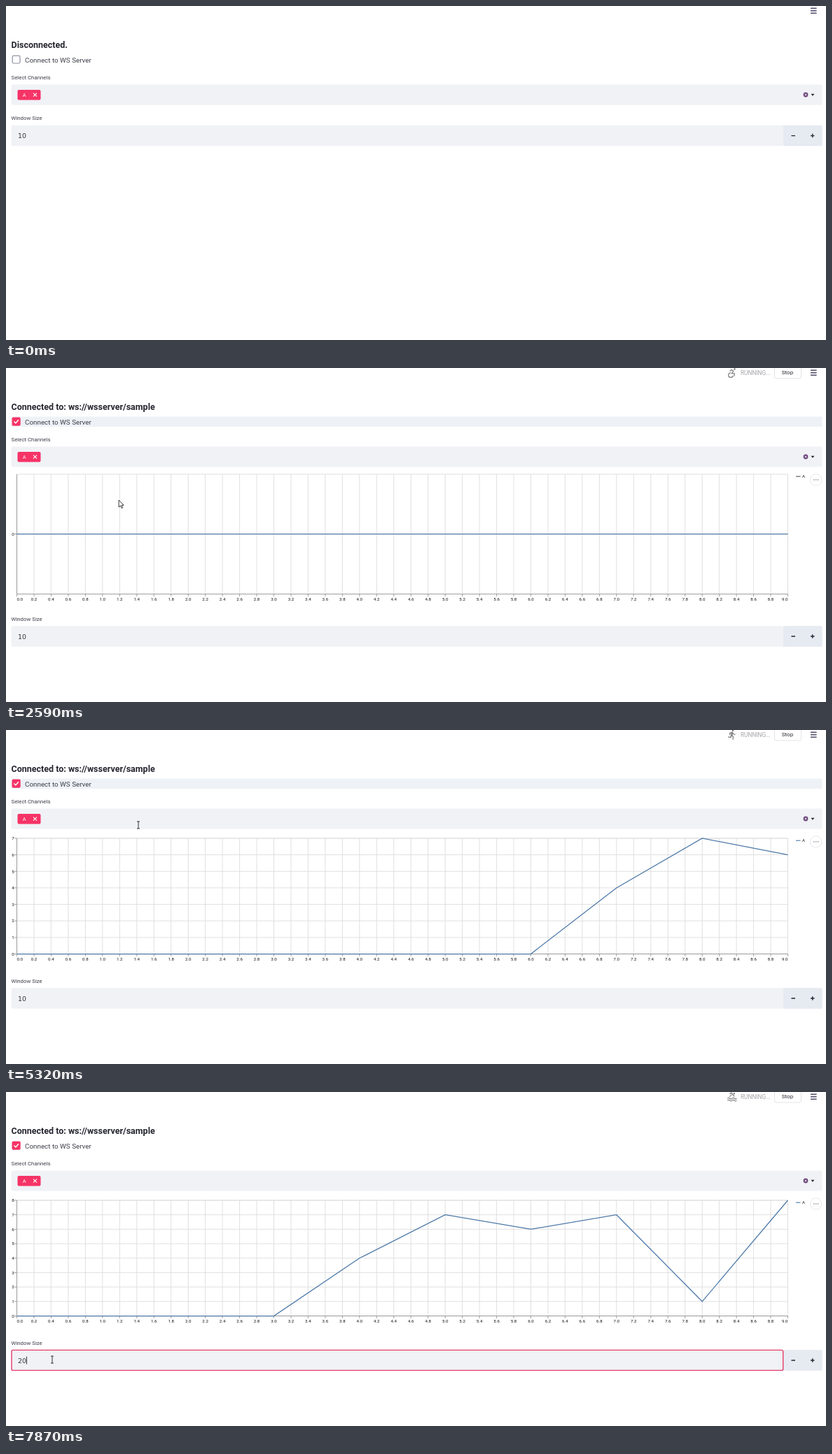
These frames come from a looping animation (1171 px wide and 478 px high, 8000 ms). An HTML page:

```html
<!DOCTYPE html>
<html lang="en">
<head>
<meta charset="utf-8">
<style>
html, body { margin: 0; height: 100%; overflow: hidden; background: #fff; }
svg { display: block; width: 1171px; height: 478px; font-family: Roboto, "Noto Sans", sans-serif; }
</style>
</head>
<body>
<svg id="stage" viewBox="0 0 1171 478"></svg>
<script>
const LOOP = 8000;
const CONNECT = 2200, CHART = 2430, FOCUS = 6800;
const INK = '#262730', PINK = '#f63366', PANEL = '#f0f2f6';
const stage = document.getElementById('stage');

const clamp = v => Math.max(0, Math.min(1, v));
const rect = (x, y, w, h, fill, extra = '') =>
  `<rect x="${x}" y="${y}" width="${w}" height="${h}" fill="${fill}" ${extra}/>`;
const text = (x, y, size, str, fill = INK, extra = '') =>
  `<text x="${x}" y="${y}" font-size="${size}" fill="${fill}" ${extra}>${str}</text>`;
const line = (d, color, width = 1, extra = '') =>
  `<path d="${d}" fill="none" stroke="${color}" stroke-width="${width}" ${extra}/>`;
const dot = (x, y, r, fill, extra = '') =>
  `<circle cx="${x}" cy="${y}" r="${r}" fill="${fill}" ${extra}/>`;

// Values reach the sliding window of ten at these moments.
const series = [...Array(10).fill(0), 4, 7, 6, 7, 1, 8];
const arrivals = [3290, 4290, 5320, 5750, 6330, 6870];

// [time, input text]
const typed = [[0, '10'], [7170, '1'], [7250, ''], [7400, '2'], [7550, '20']];

// Pointer moves: start, end, steps, then waypoints [part, x, y].
const moves = [
  [980, 1140, 3, [[0, 300, 288], [1, 264, 205]]],
  [1370, 2130, 11, [[0, 264, 205], [.75, 28, 86], [.9, 4, 65], [1, 13, 72]]],
  [2200, 2740, 8, [[0, 13, 72], [.143, 13, 72], [.714, 161, 189], [1, 303, 272]]],
  [3610, 4370, 11, [[0, 303, 272], [.4, 262, 222], [1, 189, 136]]],
  [6250, 6710, 7, [[0, 189, 136], [.5, 120, 270], [1, 66, 383]]]
];

function pointer(t) {
  const move = moves.filter(m => t >= m[0]).pop();
  if (!move) return null;
  const [from, to, steps, way] = move;
  const part = Math.floor(clamp((t - from) / (to - from)) * (steps - 1) + .01) / (steps - 1);
  const i = Math.max(1, way.findIndex(w => w[0] >= part - 1e-6));
  const [a, ax, ay] = way[i - 1], [b, bx, by] = way[i];
  const k = clamp((part - a) / (b - a));
  return { x: ax + (bx - ax) * k, y: ay + (by - ay) * k };
}

function drawPointer({ x, y }, inputTop) {
  const inside = (top, bottom) => y >= top && y <= bottom;
  let shape;
  if (inside(112, 141) || inside(inputTop, inputTop + 30))
    shape = line('M-2-5H2M0-5V5M-2 5H2', '#333', 1);
  else if (inside(70, 84) && x < 123)
    shape = '<path d="M-1 8V.5Q0-1 1 .5V5L5 5.5Q7 6 6.5 8L5.5 13H-.5L-4 8Q-4 6.3-2.6 6.9L-1 8.5zM3 5V8M5 5.5V8" fill="#fff" stroke="#222" stroke-width=".9"/>';
  else
    shape = '<path d="M0 0V10L2.4 7.8 4 11.5 5.6 10.8 4 7.2H7z" fill="#fff" stroke="#222" stroke-width=".9"/>';
  return `<g transform="translate(${x.toFixed(1)} ${y.toFixed(1)})">${shape}</g>`;
}

// Activity pictograms on a 24 unit grid: filled, or stroked when the flag is set.
const head = (x, y) => `M${x - 1} ${y}a1 1 0 1 0 2 0a1 1 0 1 0-2 0`;
const wave = y => `M2 ${y}q2.5-2.4 5 0t5 0 5 0 5 0`;
const icons = [
  ['M13.5 5.5a2 2 0 1 0 0-4 2 2 0 0 0 0 4zm-3.6 13.9l1-4.4 2.1 2v6h2v-7.5l-2.1-2 .6-3c1.3 1.5 3.3 2.5 5.5 2.5v-2c-1.9 0-3.5-1-4.3-2.4l-1-1.6c-.4-.6-1-1-1.7-1-.3 0-.5.1-.8.1l-5.2 2.2v4.7h2v-3.4l1.8-.7-1.6 8.1-4.9-1-.4 2 7 1.4z'],
  [head(16.5, 5.5) + 'M6.5 6.5L10.5 4 17 12M11 8L6.5 12.5' + wave(16) + wave(20.5), true],
  ['M8.5 14.5L4 19l1.5 1.5L9 17h2zM15 1a2 2 0 1 0 0 4 2 2 0 0 0 0-4zm6 20l-3 3-3-3v-1.5l-7.1-7.1-.9.1v-2.2c1.7 0 3.6-.9 4.7-2l1.4-1.6c.5-.5 1-.7 1.7-.7 1.2 0 2.2 1 2.2 2.3V14c0 .8-.4 1.6-.9 2.2l-3.6-3.6v-2.3c-.6.5-1.4 1-2.3 1.4l6.3 6.3H18z'],
  ['M12 2a2 2 0 1 1 0 4 2 2 0 0 1 0-4zm9 7h-6v13h-2v-6h-2v6H9V9H3V7h18z'],
  [head(17.5, 4.5) + 'M9.5 12.5A5 5 0 1 0 14 18.5M7 9L10.5 6 15 8.5 11.5 14H17V20', true],
  [head(15.5, 3.5) + 'M1 17a4 4 0 1 0 8 0a4 4 0 1 0-8 0M15 17a4 4 0 1 0 8 0a4 4 0 1 0-8 0M12 20V15L9 12 12.5 8.5 14.5 11H19', true]
];

function drawStatus(t) {
  const n = Math.floor((t - 2850) / 200);
  const [d, stroked] = icons[(n + 12) % 6];
  const color = '#858585';
  const icon = stroked ? line(d, color, 2) : `<path d="${d}" fill="${color}"/>`;
  return `<g opacity="${clamp((t - 2250) / 250).toFixed(2)}">
    <g transform="translate(1029 -1.4) scale(.66)">${icon}</g>
    ${text(1049, 10, 8.3, 'RUNNING...', '#a3a4aa')}
    ${rect(1097.5, -5, 38, 20, '#fff', 'rx="2.5" stroke="#e2e3e8"')}
    ${text(1116, 9, 8, 'Stop', INK, 'text-anchor="middle"')}</g>`;
}

function drawChart(t, hover) {
  const n = arrivals.filter(a => t >= a).length;
  const data = series.slice(n, n + 10);
  const max = Math.max(...data), flat = max === 0;
  const step = max < 5 ? .5 : 1, digits = max && max < 5 ? 1 : 0;
  const left = digits ? 20.5 : 15.5, right = 1116.5;
  const top = flat ? 152 : 155, bottom = flat ? 323.5 : 320.5;
  const px = v => left + v / 9 * (right - left);
  const py = v => flat ? 237.5 : bottom - v / max * (bottom - top);
  let grid = '', ticks = '', labels = '';
  for (let i = 0; i <= 45; i++) {
    const x = px(i / 5).toFixed(1);
    grid += `M${x} ${top}V${bottom}`;
    ticks += `M${x} ${bottom}v3.5`;
    const anchor = i === 0 ? 'start' : i === 45 ? 'end' : 'middle';
    labels += text(x, bottom + 9.8, 6.2, (i / 5).toFixed(1), '#111', `text-anchor="${anchor}"`);
  }
  for (let v = 0; v <= max; v += step) {
    const y = py(v).toFixed(1);
    if (!flat) grid += `M${left} ${y}H${right}`;
    ticks += `M${left} ${y}h-3.5`;
    labels += text(left - 3.8, +y + 2.2, 6.2, v.toFixed(digits), '#111', 'text-anchor="end"');
  }
  const points = data.map((v, i) => `${px(i).toFixed(1)} ${py(v).toFixed(1)}`).join('L');
  const key = top + 3.2;
  const ink = hover ? INK : '#b5b6bb';
  return line(grid, '#ddd', .9) +
    line(`M${left} ${top}H${right}V${bottom}`, '#ddd', .9) +
    line(ticks + `M${left} ${top}V${bottom}H${right}`, '#888', .8) + labels +
    (flat ? line(`M${left} 237.5H${right}`, '#777', 1) : '') +
    line('M' + points, '#4c78a8', 1.25) +
    line(`M1128 ${key}h6.5`, flat ? '#555' : '#4c78a8', 1.1) +
    text(1137, key + 2, 6.2, 'A', '#111') +
    dot(1156.7, 160, 8.2, '#fff', `stroke="${hover ? '#666873' : '#e4e5ea'}" stroke-width=".9"`) +
    [-3, 0, 3].map(dx => dot(1156.7 + dx, 160, 1.1, ink)).join('');
}

function drawForm(t) {
  const on = t >= CONNECT;
  const check = on
    ? `<g opacity="${clamp((t - CONNECT) / 150).toFixed(2)}">` + rect(8.5, 70.5, 12.2, 12.2, PINK, 'rx="2"') +
      line('M11.5 76.6L13.8 79 17.9 74.2', '#fff', 1.5) + '</g>'
    : rect(9.2, 71.2, 10.8, 10.8, '#fff', 'rx="1.8" stroke="#8d90a0" stroke-width="1.2"');
  return line('M1149 3.3h8.6M1149 6.8h8.6M1149 10.3h8.6', '#514c68', 1.6) +
    text(7.5, 59.7, 12.5, on ? 'Connected to: ws://wsserver/sample' : 'Disconnected.', INK, 'font-weight="600"') +
    (on && t < FOCUS ? rect(7.5, 69.5, 1158, 14.5, '#eef2f7', 'rx="1"') : '') + check +
    text(27, 80.5, 9.85, 'Connect to WS Server', '#3c3e49') +
    text(7.5, 105, 7.85, 'Select Channels', '#3c3e49') +
    rect(7.5, 112.5, 1158, 29, PANEL, 'rx="2"') +
    rect(16.5, 120, 33, 14.5, PINK, 'rx="2"') +
    text(23.8, 130, 7.5, 'A', '#fff') +
    line('M39 124.7l5 5m0-5l-5 5', '#fff', 1.1) +
    dot(1142, 127, 3.4, '#6f4a7d') +
    line('M1140.7 125.7l2.6 2.6m0-2.6l-2.6 2.6', '#fff', .8) +
    '<path d="M1149.5 125.7h5l-2.5 3z" fill="#262730"/>';
}

function drawInput(t, top) {
  const value = typed.filter(e => t >= e[0]).pop()[1];
  const mid = top + 14.8, focused = t >= FOCUS;
  const glyph = 'font-family="DejaVu Sans, sans-serif"';
  return text(7.5, top - 7.7, 7.8, 'Window Size', '#3c3e49') +
    rect(7.5, top, 1158, 29.5, PANEL, 'rx="2"') +
    rect(1110, top, 55.5, 29.5, '#e6eaf1', 'rx="1.5"') +
    line(`M1121.5 ${mid}h5.5M1149 ${mid}h5.5m-2.75-2.75v5.5`, INK, 1.4) +
    text(17, mid + 3.7, 9.4, value, '#31333f', glyph) +
    (focused
      ? rect(8, top + .2, 1101.7, 29, 'none', `rx="2" stroke="#e63c69" stroke-width="1.4"`) +
        line(`M${17.5 + value.length * 6} ${mid - 5.5}v11`, '#222', .9)
      : '');
}

let shown = '';
function frame() {
  const t = performance.now() % LOOP;
  const charted = t >= CHART;
  const top = charted ? 369.2 : 170.8;
  const p = pointer(t);
  const hover = t > 2660 && p.y > 145 && p.y < 337;
  const picture = drawForm(t) +
    (t >= CONNECT ? drawStatus(t) : '') +
    (charted ? drawChart(t, hover) : '') +
    drawInput(t, top) +
    (p ? drawPointer(p, top) : '');
  if (picture !== shown) stage.innerHTML = shown = picture;
  requestAnimationFrame(frame);
}
frame();
</script>
</body>
</html>
```
